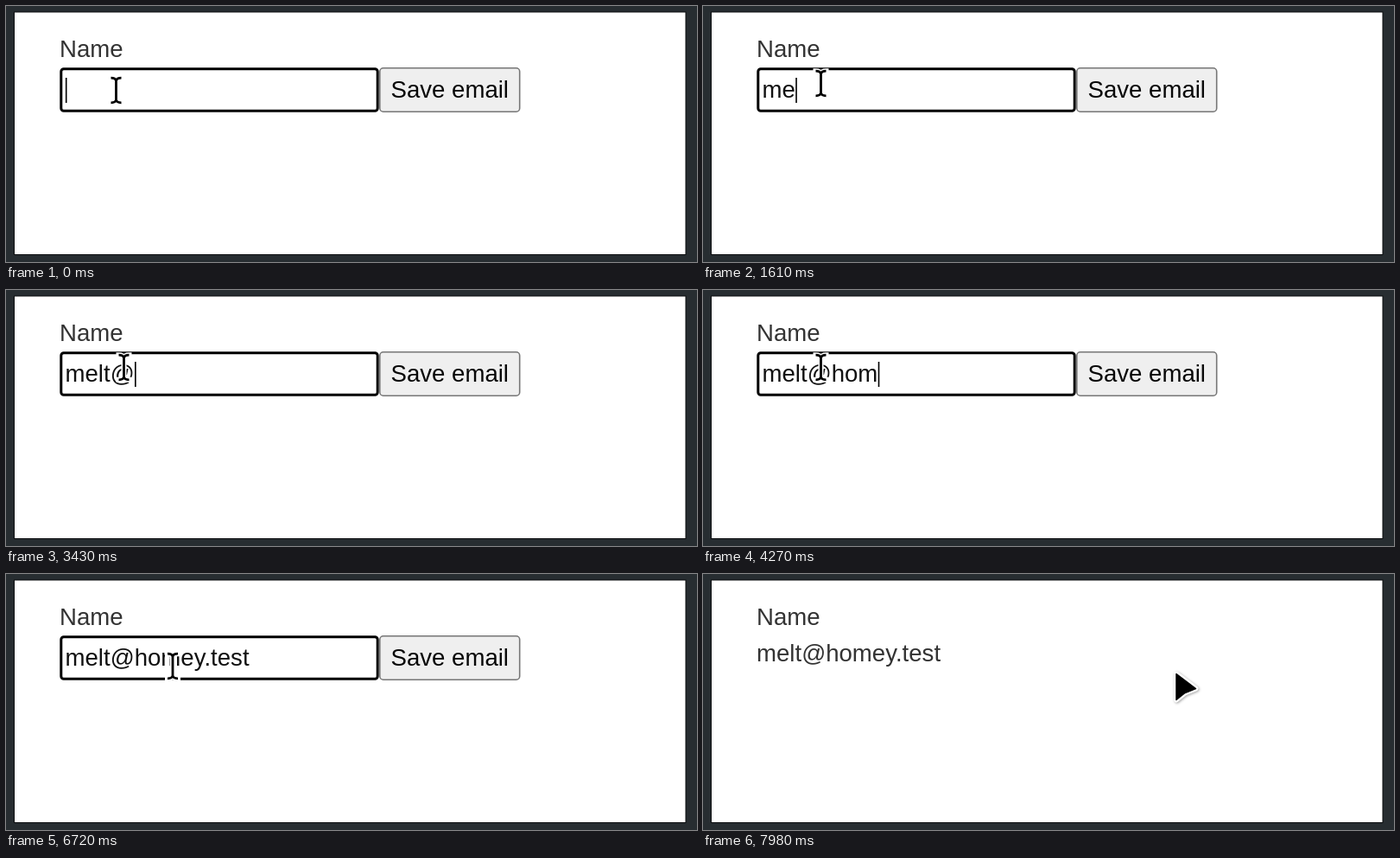
Recreate the animation shown at these times as an HTML page with a canvas. Size 800 by 296 pixels, loop 8 s.

```html
<!DOCTYPE html>
<html lang="en">
<head>
<meta charset="utf-8">
<title>Save email form</title>
<style>
  html, body { margin: 0; width: 100%; height: 100%; overflow: hidden; background: #272d31; }
  canvas { display: block; width: 100vw; height: 100vh; }
</style>
</head>
<body>
<canvas id="stage" width="800" height="296"></canvas>
<script>
const ctx = document.getElementById('stage').getContext('2d');

const LOOP = 8000, STEP = 70, BLINK = 500, SAVED_AT = 7770;
const EMAIL = 'melt@homey.test';
// time at which each character appears
const KEYS = [1400, 1540, 1890, 2030, 2310, 3710, 3920, 4130,
              4480, 4620, 4830, 5040, 5180, 5320, 5810];

const easeIn = u => u * u;
const easeOut = u => 1 - (1 - u) * (1 - u);
const smooth = u => u * u * (3 - 2 * u);
const MOVES = [
  { from: 840, to: 1190, a: [127.5, 97.5], b: [136.5, 89.5], ease: smooth },
  { from: 6480, to: 6720, a: [136.5, 89.5], b: [193, 106.5], ease: easeIn },
  { from: 6720, to: 7350, a: [193, 106.5], b: [547.5, 114.5], ease: easeOut }
];

function pointerAt(t) {
  let pos = MOVES[0].a;
  for (const m of MOVES) {
    if (t < m.from) break;
    const u = m.ease(Math.min(1, (t - m.from) / (m.to - m.from)));
    pos = m.a.map((v, i) => v + (m.b[i] - v) * u);
  }
  return pos;
}

function box(x, y, w, h, r, line, stroke, fill) {
  ctx.beginPath();
  ctx.roundRect(x + line / 2, y + line / 2, w - line, h - line, r);
  ctx.fillStyle = fill;
  ctx.fill();
  ctx.lineWidth = line;
  ctx.strokeStyle = stroke;
  ctx.stroke();
}

function text(str, x, y, color) {
  ctx.fillStyle = color;
  ctx.fillText(str, x, y);
}

function drawPage() {
  ctx.fillStyle = '#272d31';
  ctx.fillRect(0, 0, 800, 296);
  ctx.fillStyle = '#0b0d0f';
  ctx.fillRect(9, 6.5, 778.5, 281.5);
  ctx.fillStyle = '#fff';
  ctx.fillRect(10, 7.5, 776.5, 279.5);
  text('Name', 62, 59, '#333');
}

function drawForm(t) {
  box(432, 71, 163.5, 52, 4, 1.6, '#767676', '#efefef');
  text('Save email', 445.5, 106, '#080808');
  box(62.3, 71.3, 369.4, 51.4, 3, 3, '#000', '#fff');

  const count = KEYS.filter(k => k <= t).length;
  const typed = EMAIL.slice(0, count);
  text(typed, 68.5, 106, '#111');

  const since = t - (count ? KEYS[count - 1] : 0);
  if (since % (2 * BLINK) < BLINK) {
    ctx.fillStyle = '#000';
    ctx.fillRect(68.9 + ctx.measureText(typed).width, 83, 1.6, 29);
  }
}

function drawBeam(x, y) {
  ctx.beginPath();
  for (const s of [-1, 1]) {
    for (const side of [-1, 1]) {
      ctx.moveTo(x + side * 6, y + s * 14.3);
      ctx.quadraticCurveTo(x + side * 0.8, y + s * 14.3, x, y + s * 11);
    }
  }
  ctx.moveTo(x, y - 12);
  ctx.lineTo(x, y + 12);
  ctx.lineCap = 'square';
  ctx.lineJoin = 'round';
  ctx.lineWidth = 6;
  ctx.strokeStyle = '#fff';
  ctx.stroke();
  ctx.lineCap = 'butt';
  ctx.lineWidth = 2.8;
  ctx.strokeStyle = '#000';
  ctx.stroke();
}

function drawArrow(x, y) {
  ctx.beginPath();
  ctx.moveTo(x + 0.5, y + 1);
  ctx.lineTo(x + 23, y + 18);
  ctx.lineTo(x + 10.5, y + 23);
  ctx.lineTo(x + 0.5, y + 31);
  ctx.closePath();
  ctx.save();
  ctx.lineJoin = 'round';
  ctx.lineWidth = 6;
  ctx.strokeStyle = '#fff';
  ctx.shadowColor = 'rgba(0,0,0,.35)';
  ctx.shadowBlur = 3;
  ctx.shadowOffsetX = ctx.shadowOffsetY = 1;
  ctx.stroke();
  ctx.restore();
  ctx.fillStyle = ctx.strokeStyle = '#000';
  ctx.lineJoin = 'round';
  ctx.lineWidth = 1.5;
  ctx.fill();
  ctx.stroke();
}

function draw(t) {
  ctx.font = '27.6px "Liberation Sans", Arial, sans-serif';
  drawPage();
  if (t < SAVED_AT) drawForm(t);
  else text(EMAIL, 62, 101, '#333');

  const [x, y] = pointerAt(t);
  (x < 432 ? drawBeam : drawArrow)(x, y);
}

const start = performance.now();
function tick() {
  const t = (performance.now() - start) % LOOP;
  draw(Math.floor(t / STEP) * STEP);
  requestAnimationFrame(tick);
}
tick();
</script>
</body>
</html>
```
